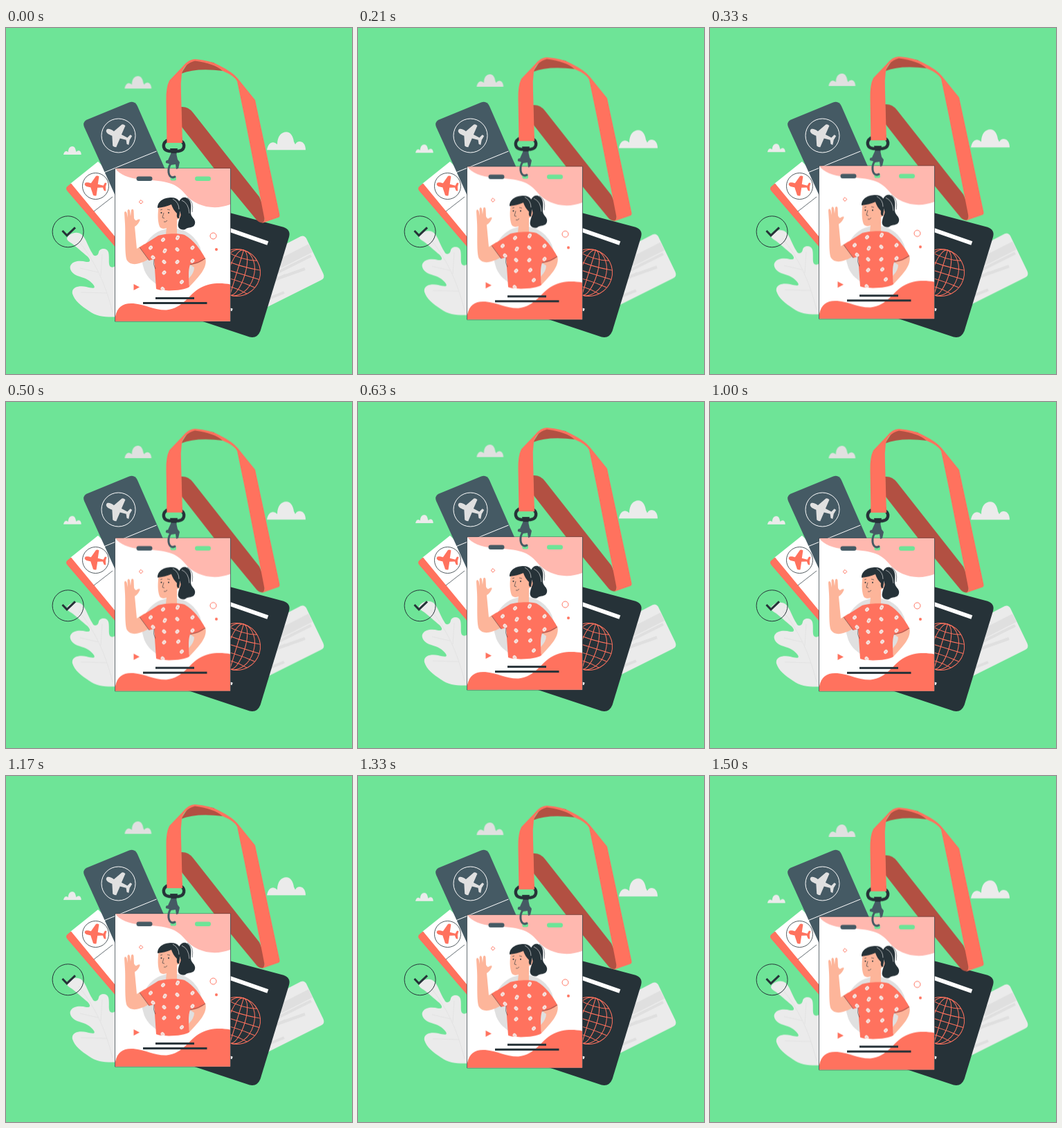
An HTML page without scripts for the animation above (1540 ms loop, 500 by 500 pixels).

```html
<!DOCTYPE html>
<html lang="en">
<head>
<meta charset="utf-8">
<title>Floating badge</title>
<style>
  html, body { margin: 0; width: 100%; height: 100%; overflow: hidden; background: #6ee497; }
  svg { display: block; width: 100%; height: 100%; }
  .coral { fill: #ff725e; }
  .under { fill: #b25042; }
  .dark { fill: #263238; }
  .slate { fill: #455a64; }
  .skin { fill: #fdb59a; }
  .grey { fill: #e0e0e0; }
  .pale { fill: #ebebeb; }
  .line { fill: none; stroke: #263238; }
  .red-line { fill: none; stroke: #ff725e; }
  .white-line { fill: none; stroke: #fff; }
  .round { stroke-linecap: round; stroke-linejoin: round; }
  .float { animation: float 1540ms infinite; }
  /* 37 equal frames: 18 steps up, 18 steps down, one held */
  @keyframes float {
    0% { transform: translateY(0); animation-timing-function: steps(18); }
    48.65% { transform: translateY(-9.5px); animation-timing-function: steps(18); }
    97.3%, 100% { transform: translateY(.6px); }
  }
</style>
</head>
<body>
<svg viewBox="0 0 500 500">
  <defs>
    <path id="cloud" d="M0 26C2 15 9 12 15 18C15 6 21 0 28 0C34 0 38 6 39 14L41 18C44 11 56 12 56 26Z"/>
    <path id="plane" d="M-16 -1C-16 -4 -11 -4 -7 -3L-1 -14Q1 -15.500 3.500 -14L3 -2.500L11 -1.500L13 -6L15.500 -5.500L14.500 0L15.500 6L13 6L10.500 1.500L3 2.500L2.500 14Q0 15 -2 14L-7 3C-12 3 -16 2 -16 -1Z"/>
    <path id="prints" d="M226.500 306.500l1 -1M247.500 304l1 -2M208.500 318l1 -1M229 323l1 -2M248 320.500l-1 -1M269 318l1 -1M212 331l1 1M228 337.500l1 1M247 338.500l1 -1M269 337l1 -1M228 354l1 -1M249.500 352l-1 1M226 376.500l1 1M253.500 367.500l1 -1"/>
    <clipPath id="shirt">
      <path d="M193 317L220 300C228 297 250 296 258 299C271 306 281 320 288 333C283 338 276 341 266 342C263 350 264 362 265 374C258 380 225 381 217 377L214 334L207 336Z"/>
    </clipPath>
  </defs>

  <g class="float">
    <use href="#cloud" class="grey" transform="translate(171.500 69.500) scale(.69)"/>
    <use href="#cloud" class="pale" transform="translate(83 171) scale(.46)"/>
    <use href="#cloud" class="pale" transform="translate(377 150.300)"/>
    <path class="pale" d="M88 304C90 297 103 292 110 299C116 305 118 315 125 326C127 331 133 330 134 324C135 318 146 317 148 324C150 332 147 342 151 345Q154 347 158 344V417.500C145 418 130 417 120 409C108 401 99 394 96 384C94 374 106 372 116 374C124 376 130 377 127 372C122 365 116 362 106 359C95 356 90 347 94 342C98 336 108 336 116 338C124 339 122 333 115 328C107 321 98 313 93 310Q88 307 88 304Z"/>
    <path fill="none" stroke="#dedede" stroke-width=".6" d="M105 308Q139 349 154 411M133 353L107 347M146 383L108 382M137 358L139 327"/>

    <path class="pale" d="M370 330L426 301Q431 299 434 304L458.500 355Q461.500 361.500 455 364.500L370 407Z"/>
    <g fill="none" stroke="#dfdfdf" stroke-width="4">
      <path stroke-width="13" d="M395 341L440 318"/>
      <path d="M385 357L441 329M390 363L432 348M375 371L404 357M372 394L402 382"/>
    </g>
  </g>

  <!-- passport -->
  <path class="dark" d="M300 261L325 267.500L400 287.500Q412 291 409 302L367.500 438Q363 449 352 446.500L230 406Z"/>
  <path class="white-line" stroke-width="6" d="M318 290L378.300 311"/>
  <path class="white-line" stroke-width="4" d="M318 404L327 407.500"/>
  <g class="red-line" transform="translate(333.500 353.500) rotate(17)">
    <circle r="34"/>
    <ellipse rx="25" ry="34"/>
    <ellipse rx="12" ry="34"/>
    <path d="M0 -34V34M-34 0H34M-31 -13Q0 -9 31 -13M-31 13Q0 9 31 13M-23 -25Q0 -19 23 -25M-23 25Q0 19 23 25"/>
  </g>

  <!-- tickets -->
  <path fill="#fff" d="M93 225L133 193L175 235V330Z"/>
  <path class="coral" d="M94 224.500L88.500 229Q85.500 232 88.500 235.500L160 319V304.500Z"/>
  <path class="line" stroke-width=".7" d="M127 265L154 244"/>
  <circle class="line" cx="129.500" cy="228.500" r="19" stroke-width=".8"/>
  <use href="#plane" class="coral" transform="translate(129.500 228) rotate(6)"/>
  <path class="slate" d="M113 143Q110 136 117 132.500L178 107.500Q186 104.500 190 113L232 209L175 280Z"/>
  <path class="white-line" d="M140 209.500L217.500 178"/>
  <circle class="white-line" cx="162.500" cy="155.500" r="24.500"/>
  <use href="#plane" class="grey" transform="translate(162.500 155.500) rotate(21) scale(1.200)"/>

  <circle class="line" cx="89.600" cy="294.300" r="22.500"/>
  <path class="line" stroke-width="3" d="M81.500 293L88 299.800L100 288.300"/>

  <g class="float">
    <!-- lanyard -->
    <path class="under" d="M253 114Q263 113 270 122L366 244L375 265L373 281Q366 283 361 276L300 202L254 143Z"/>
    <path class="under" d="M253 66L262 52L272 46L300 50L314 62Q275 57 253 66Z"/>
    <path class="coral" d="M232.500 166L231.500 105Q231 86 236 76L256 55Q264 45 273 45Q296 47 308 54Q328 64 335 73L360 104L395.500 270Q396 273 393 274L370 282Q375 279 373 273L345 130L334 77Q330 69 313 62Q301 51 273 47.500Q257 52 254 66Q252 80 253 95L255 166Z"/>

    <!-- badge -->
    <path fill="#fff" stroke="#263238" stroke-width=".7" d="M157.500 203H324.500V424H157.500Z"/>
    <path fill="#ffb8af" d="M158 203C164 212 178 217 195 219C225 221 244 221 259 240C274 258 300 264 324 255V203Z"/>
    <rect class="slate" x="188.500" y="214.500" width="23" height="6.500" rx="3.250"/>
    <rect fill="#6ee497" x="273" y="214.500" width="23" height="6.500" rx="3.250"/>
    <rect fill="#6ee497" x="237.500" y="214.500" width="8.500" height="6" rx="2"/>
    <path class="coral" d="M158 423.700V417C161 402 170 397 184 398C203 400 214 408 232 407.500C256 405 264 385 280 376C294 368 310 368 324 370.500V423.700Z"/>

    <circle class="grey" cx="240" cy="333" r="43.500"/>
    <path class="red-line" d="M195 248.500l2.800 2.800l-2.800 2.800l-2.800 -2.800z"/>
    <circle class="red-line" cx="299.500" cy="300.500" r="4.500"/>
    <circle class="coral" cx="304" cy="320" r="2"/>
    <path class="coral" d="M184.500 370l8.500 4.500l-8.500 4.500z"/>

    <!-- woman -->
    <path class="skin" d="M172 283L171 267Q172 263 174.500 267L176 274L175.500 264Q177 260 179 264L180 272L181 263Q183.500 260 184.500 264L185 275Q187 280 190 277Q195 275 193 279Q190 285 186 287L189 319L200 312L208 333C195 341 181 345 175 336C171 329 173 300 172 283Z"/>
    <path class="skin" d="M266 342L288 332C292 346 279 359 265 374L264 362Q272 354 272 346Z"/>
    <path class="dark" d="M246 262C249 250 253 243 260 245C268 248 268 257 267 265C266 274 275 276 273 283C271 290 263 287 259 291C253 293 247 289 249 282C250 276 254 270 251 264Z"/>
    <path class="skin" d="M221 255C219 269 219 279 222 287C225 292 232 289 232 289L231 298Q239 302 247 298L247 277C254 275 254 266 249 265L246 252Z"/>
    <path class="dark" d="M219 260C219 249 230 245 239 245C249 245 254 252 252 262L250 275Q246 276 247 268Q241 262 239 255Q230 259 219 260Z"/>
    <path class="white-line" stroke-width=".6" d="M241 247Q250 252 250 262M254 249Q264 253 265 268"/>
    <path class="line" stroke-width=".6" d="M262 245Q272 251 269 266M269 274Q274 278 270 282M223 263l3 -1M233 262l4 1M228 267l-2 7l3 1M228 280q3 1 5 -2"/>
    <circle class="dark" cx="224.500" cy="267" r="1"/>
    <circle class="dark" cx="235" cy="267" r="1"/>
    <g clip-path="url(#shirt)">
      <rect class="coral" x="190" y="295" width="100" height="90"/>
      <use href="#prints" class="round" fill="none" stroke="#f5e6e2" stroke-width="5"/>
      <use href="#prints" class="red-line" stroke-width=".8"/>
    </g>
    <path class="line" stroke-width=".5" d="M193 317L207 336M214 334Q212 342 216 348M288 333Q278 340 266 342"/>

    <path class="line" stroke-width="3" d="M216 390.500H272M198 397.500H290.500"/>

    <!-- clip -->
    <path class="line round" stroke-width="4.500" d="M232 163C225 168 227 177 236 178H249C258 177 260 168 253 163"/>
    <path class="coral" d="M232.400 158H254.800L255 166H232.500Z"/>
    <path class="dark" d="M237 174H248L246 183H239Z"/>
    <path class="slate" d="M238.500 181H246L248 190L251 194L249 203L246 204L245 197L238 198L235 196L231 195Q230 191 234 191Z"/>
    <path class="round" fill="none" stroke="#455a64" stroke-width="3" d="M238 196C233 204 234 215 241 216L244 215"/>
  </g>
</svg>
</body>
</html>
```
